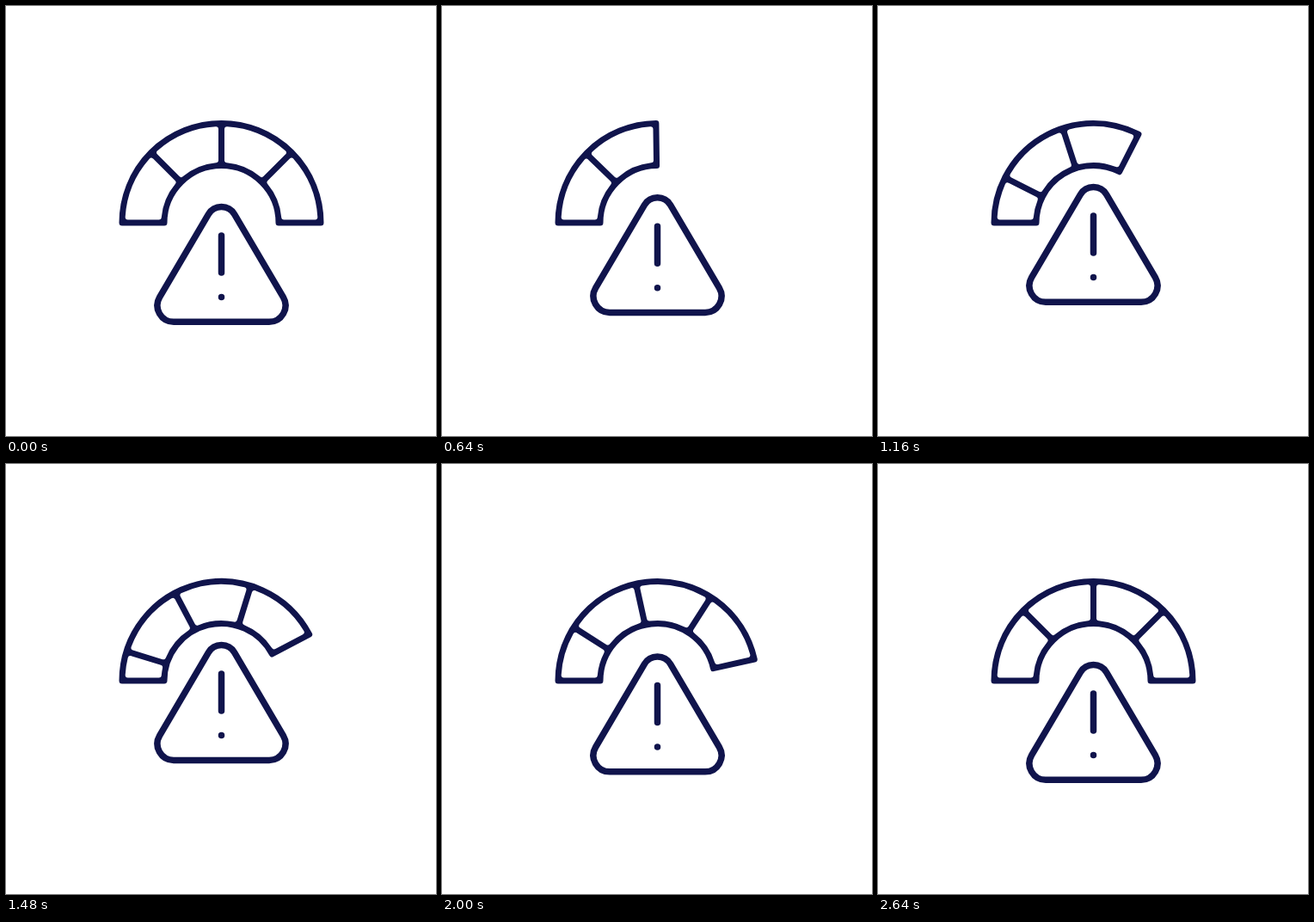
An HTML page that plays this animation: 500x500 px, repeating every 3160 ms.

```html
<!DOCTYPE html>
<html lang="en">
<head>
<meta charset="utf-8">
<title>Risk gauge</title>
<style>
  html, body { margin: 0; width: 100%; height: 100%; overflow: hidden; background: #fff; }
  svg { display: block; width: 100%; height: 100%; }
  #band { fill: #10144c; stroke: #10144c; stroke-width: 7; stroke-linejoin: round; }
  #cells { fill: #fff; stroke: #fff; stroke-width: 6; stroke-linejoin: round; }
  #sign { fill: none; stroke: #10144c; stroke-width: 7.5; stroke-linecap: round; }
</style>
</head>
<body>
<svg viewBox="0 0 500 500">
  <path id="band"/>
  <path id="cells"/>
  <g id="sign">
    <path d="M235.4 242.1A17.5 17.5 0 0 1 265.6 242.1L322.4 338.7A19 19 0 0 1 306 367.3H195A19 19 0 0 1 178.6 338.7Z"/>
    <path d="M250.5 267V310M250.5 338.5h.01"/>
  </g>
</svg>
<script>
const LOOP = 3160;
const CX = 250.5, CY = 252, OUTER = 115.5, INNER = 66.5;
const STEP = Math.PI / 4;
const INSET = 6.5; // half the line plus the corner radius of a cell

// [time, value] keys, eased between neighbours
const END = [[0, 180], [600, 89.2], [765, 89.2], [1720, 164], [2640, 180]];
const LIFT = [[160, 0], [1160, -23], [1440, -23], [2440, 0]];

const [band, cells, sign] = ['band', 'cells', 'sign'].map(id => document.getElementById(id));

function valueAt(keys, t) {
  const i = keys.findIndex(key => key[0] > t);
  if (i === 0) return keys[0][1];
  if (i < 0) return keys[keys.length - 1][1];
  const [t0, a] = keys[i - 1], [t1, b] = keys[i];
  const u = (t - t0) / (t1 - t0);
  return a + (b - a) * u * u * (3 - 2 * u);
}

// Angles run clockwise from the left end of the gauge.
const point = (r, a) =>
  `${(CX - r * Math.cos(a)).toFixed(2)} ${(CY - r * Math.sin(a)).toFixed(2)}`;

// Ring piece whose straight sides are moved inwards by a constant distance
function piece(from, to, inset) {
  const half = Math.min((to - from) / 2, Math.PI / 2);
  const ro = OUTER - inset;
  const ri = Math.max(INNER + inset, inset / Math.sin(half));
  if (ri >= ro) return '';
  const o = Math.asin(inset / ro), i = Math.asin(inset / ri);
  return `M${point(ro, from + o)}A${ro} ${ro} 0 0 1 ${point(ro, to - o)}` +
    `L${point(ri, to - i)}A${ri} ${ri} 0 0 0 ${point(ri, from + i)}Z`;
}

function draw(now) {
  const t = now % LOOP;
  const end = valueAt(END, t) * Math.PI / 180;
  let holes = '';
  for (let to = end; to > 0.001; to -= STEP) {
    holes += piece(Math.max(0, to - STEP), to, INSET);
  }
  band.setAttribute('d', piece(0, end, 0));
  cells.setAttribute('d', holes);
  sign.setAttribute('transform', `translate(0 ${valueAt(LIFT, t).toFixed(2)})`);
}

let start;
function tick(now) {
  start ??= now;
  draw(now - start);
  requestAnimationFrame(tick);
}
draw(0);
requestAnimationFrame(tick);
</script>
</body>
</html>
```
